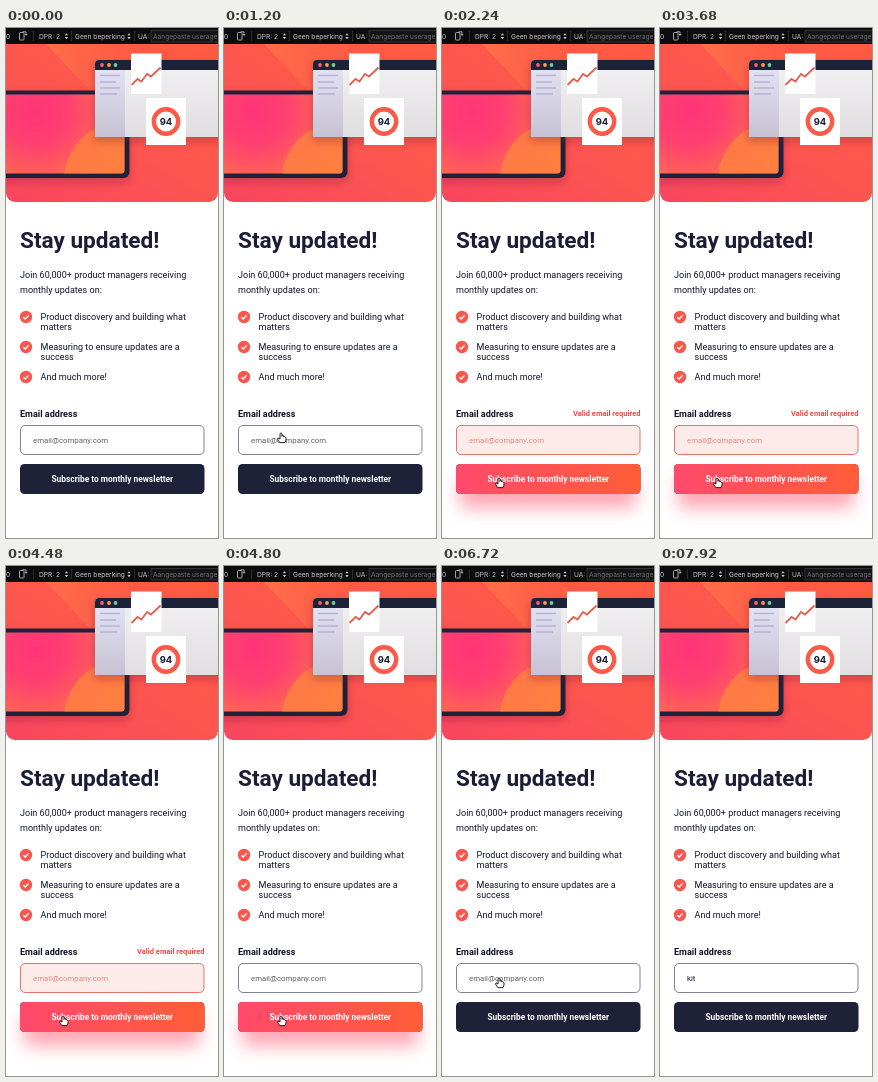
An HTML page that plays this animation: 212x510 px, repeating every 8 s.

```html
<!DOCTYPE html>
<html lang="en">
<head>
<meta charset="utf-8">
<title>Stay updated</title>
<style>
  html, body { margin: 0; width: 100%; height: 100%; overflow: hidden; background: #fff; }
  svg { display: block; width: 212px; height: 510px; }
  text { font: 9.05px Roboto, sans-serif; fill: #12132a; white-space: pre; }
  .bar text { font: 6.6px Inter, sans-serif; fill: #c8c8ca; }
  text.title { font-size: 22.6px; font-weight: 700; fill: #1b1c36; }
  text.label { font-weight: 700; }
  text.field { font-size: 7.8px; }
  text.button { font-size: 8.4px; font-weight: 700; fill: #fff; }
  text.error { font-size: 7.53px; font-weight: 700; fill: #f04a42; }
  text.score { font: 700 9.5px Inter, sans-serif; fill: #1b1c36; }
</style>
</head>
<body>
<svg viewBox="0 0 212 510">
  <defs>
    <linearGradient id="hero" x1="0" y1="1" x2=".8" y2="0">
      <stop stop-color="#f94560"/><stop offset=".5" stop-color="#fd5550"/><stop offset="1" stop-color="#ff5a42"/>
    </linearGradient>
    <linearGradient id="ray" x1="0" y1="0" x2="1" y2="0">
      <stop stop-color="#ff7a4a" stop-opacity=".7"/><stop offset="1" stop-color="#ff6a40" stop-opacity=".2"/>
    </linearGradient>
    <radialGradient id="screen" gradientUnits="userSpaceOnUse" cx="30" cy="84" r="95">
      <stop stop-color="#ff3478"/><stop offset=".35" stop-color="#ff4070"/>
      <stop offset=".7" stop-color="#ff6455"/><stop offset="1" stop-color="#ff7a40"/>
    </radialGradient>
    <linearGradient id="arc" x1="0" y1="0" x2="1" y2=".6">
      <stop stop-color="#ff8a3a" stop-opacity=".8"/><stop offset="1" stop-color="#ff7a45" stop-opacity=".3"/>
    </linearGradient>
    <linearGradient id="page" x1="0" y1="0" x2="0" y2="1">
      <stop stop-color="#f2f1f2"/><stop offset="1" stop-color="#e0dee0"/>
    </linearGradient>
    <linearGradient id="side" x1="0" y1="0" x2="0" y2="1">
      <stop stop-color="#e2e1f2"/><stop offset="1" stop-color="#c6c2d4"/>
    </linearGradient>
    <linearGradient id="hot">
      <stop stop-color="#ff4a6c"/><stop offset="1" stop-color="#ff5d38"/>
    </linearGradient>
    <filter id="blur" x="-20%" y="-150%" width="140%" height="400%"><feGaussianBlur stdDeviation="9"/></filter>
    <filter id="soft" x="-20%" y="-20%" width="140%" height="150%">
      <feDropShadow dx="0" dy="4" stdDeviation="4" flood-color="#7a1630" flood-opacity=".35"/>
    </filter>
    <clipPath id="heroClip"><path d="M0 16H212V165a9 9 0 0 1-9 9H9a9 9 0 0 1-9-9Z"/></clipPath>
    <clipPath id="screenClip"><path d="M-9 66.500H115.500a3 3 0 0 1 3 3V142.500a3 3 0 0 1-3 3H-9Z"/></clipPath>
    <g id="check">
      <circle r="6.2" fill="#f9574e"/>
      <path d="M-2.600 .2-.8 2 2.700-1.700" fill="none" stroke="#fff" stroke-width="1.300"/>
    </g>
    <path id="arrows" d="M-1.700-.9 0-3 1.700-.9ZM-1.700 .9 0 3 1.700 .9Z" fill="#c8c8ca"/>
  </defs>

  <rect width="212" height="510" fill="#fff"/>

  <g clip-path="url(#heroClip)">
    <rect y="16" width="212" height="158" fill="url(#hero)"/>
    <path d="M40 16H125V32H89V62.500H84Z" fill="url(#ray)"/>
    <g filter="url(#soft)">
      <rect x="-10" y="62.500" width="133.500" height="87.500" rx="6" fill="#1f2138"/>
    </g>
    <g clip-path="url(#screenClip)">
      <rect x="-9" y="66" width="128" height="80" fill="url(#screen)"/>
      <circle cx="116" cy="152" r="58" fill="url(#arc)"/>
    </g>
    <g filter="url(#soft)">
      <path d="M89 109V36a4 4 0 0 1 4-4H220V109Z" fill="url(#page)"/>
      <path d="M89 42V36a4 4 0 0 1 4-4H220V42Z" fill="#1f2138"/>
    </g>
    <rect x="89" y="42" width="30" height="67" fill="url(#side)"/>
    <circle cx="96" cy="37" r="1.900" fill="#ff5a78"/>
    <circle cx="103" cy="37" r="1.900" fill="#ff9a50"/>
    <circle cx="109.500" cy="37" r="1.900" fill="#6fcf97"/>
    <path d="M94 47.500H114M94 54H110M94 60H114M94 66H111" stroke="#b6b3d6" stroke-width="1.400"/>
    <rect x="125" y="25.500" width="30.500" height="40.500" fill="#fff"/>
    <rect x="140" y="70" width="40" height="47" fill="#fff"/>
    <path d="M125.500 57 131.500 51 135.500 53.500 141 46 145 48.500 154.500 39.500" fill="none" stroke="#e0604f" stroke-width="1.800"/>
    <circle cx="160" cy="93.500" r="12.200" fill="none" stroke="#fb5a48" stroke-width="4.400"/>
    <text class="score" x="160" y="97" text-anchor="middle">94</text>
  </g>

  <g class="bar">
    <rect width="212" height="16" fill="#0c0c0e"/>
    <path d="M27.500 3V13M65.500 3V13M128.500 3V13" stroke="#38383c" stroke-width=".7"/>
    <rect x="145" y="2.500" width="70" height="11.500" fill="#141416" stroke="#4a4a4f" stroke-width=".6"/>
    <text x="0" y="10.500">0</text>
    <g fill="none" stroke="#c8c8ca" stroke-width=".8">
      <rect x="13.500" y="4.500" width="4.500" height="7.500" rx=".8"/>
      <path d="M16.500 3.800H20V7M18.800 6 20 7.400 21.200 6"/>
    </g>
    <use href="#arrows" x="60.500" y="8.200"/>
    <use href="#arrows" x="123" y="8.200"/>
    <text x="33" y="10.500">DPR: 2</text>
    <text x="69" y="10.500">Geen beperking</text>
    <text x="132" y="10.500">UA:</text>
    <text x="147" y="10.500" style="fill:#707074">Aangepaste useragent</text>
  </g>

  <text class="title" x="14" y="220">Stay updated!</text>
  <text x="14" y="250">Join 60,000+ product managers receiving</text>
  <text x="14" y="264.500">monthly updates on:</text>
  <use href="#check" x="20" y="289"/>
  <text x="34.500" y="292">Product discovery and building what</text>
  <text x="34.500" y="302.300">matters</text>
  <use href="#check" x="20" y="319"/>
  <text x="34.500" y="322">Measuring to ensure updates are a</text>
  <text x="34.500" y="332.300">success</text>
  <use href="#check" x="20" y="349"/>
  <text x="34.500" y="352">And much more!</text>

  <text class="label" x="14" y="388.500">Email address</text>
  <text class="error" id="error" x="198.500" y="388.300" text-anchor="end">Valid email required</text>
  <rect id="box" x="14.500" y="397.500" width="183.500" height="29" rx="4.500" stroke-width=".9"/>
  <text class="field" id="field" x="27" y="414.700"></text>

  <rect x="14" y="436" width="184.500" height="30" rx="4.500" fill="#1f2138"/>
  <g id="hover">
    <rect x="18" y="450" width="176" height="30" rx="6" fill="#ff4a68" opacity=".5" filter="url(#blur)"/>
    <rect x="14" y="436" width="184.500" height="30" rx="4.500" fill="url(#hot)"/>
  </g>
  <text class="button" x="106.300" y="454" text-anchor="middle">Subscribe to monthly newsletter</text>

  <g id="cursor">
    <path id="arrow" d="M0 0V8L1.900 6.300 3.200 9.200 4.600 8.600 3.300 5.800H5.900Z" fill="#000" stroke="#fff" stroke-width=".6"/>
    <path id="hand" d="M-1 .6Q0-.8 1 .6V3.400Q2 0 2.600 3.700 3.600 3 4 4.200 5 3.900 5 5.200V7L4 9.600H-1.200L-3.600 6Q-3.400 4.600-2 5.300L-1 6.100Z" fill="#fff" stroke="#111" stroke-width=".9" stroke-linejoin="round"/>
  </g>
</svg>
<script>
const LOOP = 8000;
const HOVER = [1430, 5290], FADE = 160;
const ERROR = [2080, 4640];
const KEYS = [7040, 7360, 7680];
// time, x, y of the pointer tip
const PATH = [
  [820, -8, 443], [1120, 57, 405], [1280, 57, 405], [1520, 57, 450],
  [5120, 57, 450], [5440, 53, 429.5], [5720, 53, 429.5], [6100, 57, 412]
];

const el = id => document.getElementById(id);
const clamp = v => Math.max(0, Math.min(1, v));
const within = (v, a, b) => v >= a && v < b;
const show = (id, on) => el(id).setAttribute('visibility', on ? 'visible' : 'hidden');

function pointer(t) {
  let i = 0;
  while (i < PATH.length - 2 && t > PATH[i + 1][0]) i++;
  const [t0, x0, y0] = PATH[i], [t1, x1, y1] = PATH[i + 1];
  const k = clamp((t - t0) / (t1 - t0)), e = k * k * (3 - 2 * k);
  return [x0 + (x1 - x0) * e, y0 + (y1 - y0) * e];
}

function draw(t) {
  const bad = within(t, ...ERROR);
  const typed = 'kit'.slice(0, KEYS.filter(k => t >= k).length);
  const box = el('box'), field = el('field');

  show('error', bad);
  box.setAttribute('fill', bad ? '#fdebe9' : '#fff');
  box.setAttribute('stroke', bad ? '#e0675e' : '#72748a');
  field.textContent = typed || 'email@company.com';
  field.style.fill = typed ? '#12132a' : bad ? '#e58a82' : '#626262';

  el('hover').setAttribute('opacity',
    clamp((t - HOVER[0]) / FADE) - clamp((t - HOVER[1]) / FADE));

  const [x, y] = pointer(t);
  const visible = within(t, PATH[0][0], KEYS[0]);
  const active = x > 14 && (within(y, 397, 427) || within(y, 436, 466));
  el('cursor').setAttribute('transform', `translate(${x} ${y})`);
  show('hand', visible && active);
  show('arrow', visible && !active);
}

const start = performance.now();
function tick() {
  draw((performance.now() - start) % LOOP);
  requestAnimationFrame(tick);
}
tick();
</script>
</body>
</html>
```
